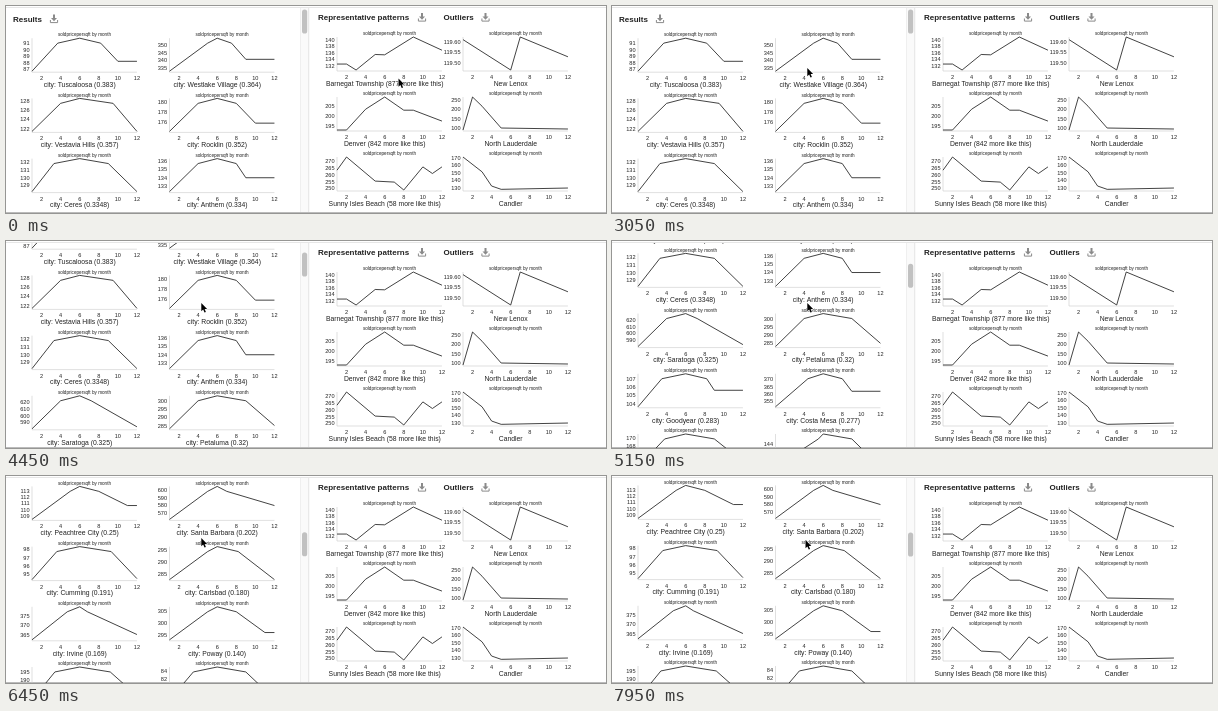
An HTML page with a canvas that plays this animation: 600x207 px, repeating every 8 s.

```html
<!DOCTYPE html>
<html lang="en">
<head>
<meta charset="utf-8">
<title>Price patterns by city</title>
<style>
html, body { margin: 0; width: 100%; height: 100%; overflow: hidden; background: #fff; }
canvas { display: block; width: 600px; height: 207px; }
</style>
</head>
<body>
<canvas id="stage"></canvas>
<script>
const W = 600, H = 207, LOOP = 8000, STEP = 50;
const MONTH = 9.54, PLOT = 33;
const canvas = document.getElementById('stage');
const ctx = canvas.getContext('2d');
const dpr = window.devicePixelRatio || 1;
canvas.width = W * dpr;
canvas.height = H * dpr;

const results = [], patterns = [];

// Every result is a summer hump: up by month `rise`, peak in June,
// down from month `fall`, level at `tail` from month `settle`.
function city(name, lo, hi, rise, fall, settle, tail) {
  const line = [[1, 0], [rise, 0.85], [6, 1], [fall, 0.85], [settle, tail], [12, tail]];
  results.push({ label: 'city: ' + name, lo, hi, line });
}

// A pattern is a line through a few [month, level] points.
function pattern(label, lo, hi, ...line) {
  patterns.push({ label, lo, hi, line });
}

city('Tuscaloosa (0.383)', 86.7, 91.8, 3.7, 8.2, 10, 0.3);
city('Westlake Village (0.364)', 332.8, 354.9, 5, 7.5, 9, 0.36);
city('Vestavia Hills (0.357)', 121.4, 128.5, 4, 9.5, 12, 0);
city('Rocklin (0.352)', 174.1, 180.7, 4, 8, 10, 0.25);
city('Ceres (0.3348)', 128.2, 132.5, 3.3, 9, 12, 0);
city('Anthem (0.334)', 132.3, 136.3, 4, 8, 9, 0.42);
city('Saratoga (0.325)', 580.4, 629.7, 4, 7.2, 12, 0.06);
city('Petaluma (0.32)', 283.1, 303, 4, 9, 12, 0.1);
city('Goodyear (0.283)', 103.6, 107.7, 3.5, 8.2, 9, 0.5);
city('Costa Mesa (0.277)', 351.4, 373.7, 4.4, 8, 9, 0.47);
city('Lincoln (0.260)', 162.9, 171, 3.8, 9, 12, 0.16);
city('Ken Caryl (0.2533)', 139.9, 145.8, 5.5, 9, 11, 0.28);
city('Peachtree City (0.25)', 108.5, 113.7, 5, 8, 11, 0.42);
city('Santa Barbara (0.202)', 561.3, 605.3, 5, 7, 12, 0.42);
city('Cumming (0.191)', 94.4, 98.3, 3.6, 9.3, 12, 0.03);
city('Carlsbad (0.180)', 282.4, 296.7, 5, 8.2, 12, 0);
city('Irvine (0.169)', 362.2, 379.9, 4.7, 6.8, 12, 0.16);
city('Poway (0.140)', 292.8, 306.9, 5, 8, 11, 0.22);
city('Folsom (0.132)', 177.8, 198.4, 3.4, 9.2, 12, 0.13);
city('Novato (0.128)', 76.4, 85.2, 3.5, 9, 12, 0.03);

pattern('Barnegat Township (877 more like this)', 130.8, 140.8,
  [1, 0.18], [2, 0.18], [3, 0], [5, 0.47], [6, 0.46], [9, 1], [12, 0.6]);
pattern('New Lenox', 119.464, 119.624, [1, 0.92], [6, 0], [7, 1], [12, 0.4]);
pattern('Denver (842 more like this)', 192.9, 209.9,
  [1, 0], [2, 0], [4, 0.63], [6, 1], [8, 0.6], [9, 0.6], [12, 0.27]);
pattern('North Lauderdale', 88.7, 266, [1, 0], [2, 1], [3, 0.72], [5, 0.06], [12, 0.03]);
pattern('Sunny Isles Beach (58 more like this)', 248.7, 273.3,
  [1, 0.6], [2, 1], [5, 0.27], [7, 0.24], [8, 0], [10, 0.7], [11, 0.5], [12, 0.7]);
pattern('Candler', 127.3, 171.3, [1, 1], [3, 0.55], [4, 0.12], [5, 0.02], [12, 0.06]);

// [start, end, scroll position reached]
const scrolls = [
  [3600, 3900, 28], [4300, 4600, 68], [4900, 5350, 158], [5600, 6050, 330], [6400, 6450, 383],
  [6650, 6850, 325], [7150, 7350, 264], [7750, 7950, 384]
];
// [time, x, y]
const cursorKeys = [
  [0, 392.5, 72.5], [400, 392.5, 72.5], [700, 417, 46], [850, 400, 33], [950, 400, 33],
  [1050, 395, 33], [1400, 395, 33], [1900, 373.5, 58], [2250, 323, 110], [2450, 290, 127],
  [2950, 197, 56], [3050, 195.3, 62], [7550, 195.3, 62], [7600, 193.5, 64]
];

function scrollAt(t) {
  let pos = 0;
  for (const [start, end, to] of scrolls) {
    const p = Math.min(1, Math.max(0, (t - start) / (end - start)));
    pos += (to - pos) * (1 - (1 - p) ** 2);
  }
  return pos;
}

function cursorAt(t) {
  const next = cursorKeys.findIndex(k => k[0] > t);
  if (next < 0) return cursorKeys[cursorKeys.length - 1].slice(1);
  const [t0, x0, y0] = cursorKeys[next - 1], [t1, x1, y1] = cursorKeys[next];
  const p = (t - t0) / (t1 - t0);
  return [x0 + (x1 - x0) * p, y0 + (y1 - y0) * p];
}

// Round step of 1, 2 or 5 times a power of ten, for about four ticks
function tickStep(span) {
  const power = 10 ** Math.floor(Math.log10(span / 4));
  const error = 4 * power / span;
  return power * (error <= 0.15 ? 10 : error <= 0.35 ? 5 : error <= 0.75 ? 2 : 1);
}

function text(s, x, y, size, align = 'center', weight = 'normal') {
  ctx.font = `${weight} ${size}px "Liberation Sans", Arial, sans-serif`;
  ctx.textAlign = align;
  ctx.fillText(s, x, y + size * 0.35);
}

function rect(color, x, y, w, h) {
  ctx.fillStyle = color;
  ctx.fillRect(x, y, w, h);
}

function path(points, color, width) {
  ctx.beginPath();
  points.forEach(([x, y]) => ctx.lineTo(x, y));
  ctx.strokeStyle = color;
  ctx.lineWidth = width;
  ctx.stroke();
}

function chart({ label, lo, hi, line }, x, base) {
  if (base < -20 || base > H + 45) return;
  const monthX = m => x + (m - 1) * MONTH;
  const levelY = level => base - level * PLOT;
  path([[x, base - PLOT], [x, base + 1], [monthX(12), base + 1]], '#ccc', 0.6);
  ctx.fillStyle = '#222';
  text('soldpricepersqft by month', monthX(6.5), base - 36.5, 4.65);
  const step = tickStep(hi - lo);
  for (let i = Math.ceil(lo / step); i * step <= hi; i++) {
    const value = (i * step).toFixed(step < 1 ? 2 : 0);
    text(value, x - 2.5, levelY((i * step - lo) / (hi - lo)), 5.6, 'right');
  }
  for (let m = 2; m <= 12; m += 2) text(m, monthX(m), base + 7, 5.6);
  text(label, monthX(6), base + 13.5, 6.8);
  path(line.map(([m, level]) => [monthX(m), levelY(level)]), '#222', 0.85);
}

function heading(s, x, y, iconX) {
  ctx.fillStyle = '#222';
  text(s, x, y, 8, 'left', 'bold');
  ctx.save();
  ctx.translate(iconX, y);
  rect('#8a8a8a', -1, -4.5, 2, 4);
  ctx.beginPath();
  ctx.moveTo(-3, -1);
  ctx.lineTo(3, -1);
  ctx.lineTo(0, 2.2);
  ctx.fill();
  path([[-3.6, 1], [-3.6, 3.6], [3.6, 3.6], [3.6, 1]], '#8a8a8a', 1);
  ctx.restore();
}

function cursor(x, y) {
  const shape = [[0, 0], [0, 8.2], [1.9, 6.5], [3.2, 9.5], [4.6, 8.9], [3.3, 6], [5.8, 6], [0, 0]];
  path(shape.map(([dx, dy]) => [x + dx, y + dy]), '#fff', 1);
  ctx.fillStyle = '#000';
  ctx.fill();
}

function draw(t) {
  const scroll = scrollAt(t);
  ctx.setTransform(dpr, 0, 0, dpr, 0, 0);
  ctx.lineJoin = 'round';
  rect('#fff', 0, 0, W, H);
  rect('#e6e6e6', 0, 1, W, 1);
  rect('#bbb', 0, 206, W, 1);

  ctx.save();
  ctx.beginPath();
  ctx.rect(0, 2, 302, 205);
  ctx.clip();
  heading('Results', 7, 13 - scroll, 48);
  results.forEach((c, i) => chart(c, i % 2 ? 163.5 : 26, 65.2 + (i >> 1) * 60.2 - scroll));
  ctx.restore();

  rect('#fafafa', 294, 2, 9, 204);
  rect('#e8e8e8', 294, 2, 0.6, 204);
  rect('#dedede', 302.4, 2, 0.8, 204);
  ctx.fillStyle = '#c1c1c1';
  ctx.beginPath();
  ctx.roundRect(296, 3.5 + scroll * 0.138, 5.2, 24, 2.6);
  ctx.fill();

  heading('Representative patterns', 312, 11.5, 416);
  heading('Outliers', 437.5, 11.5, 479.5);
  patterns.forEach((c, i) => chart(c, i % 2 ? 457 : 331, 64 + (i >> 1) * 60));

  cursor(...cursorAt(t));
}

function tick(now) {
  draw(Math.floor((now % LOOP) / STEP) * STEP);
  requestAnimationFrame(tick);
}
draw(0);
requestAnimationFrame(tick);
</script>
</body>
</html>
```
